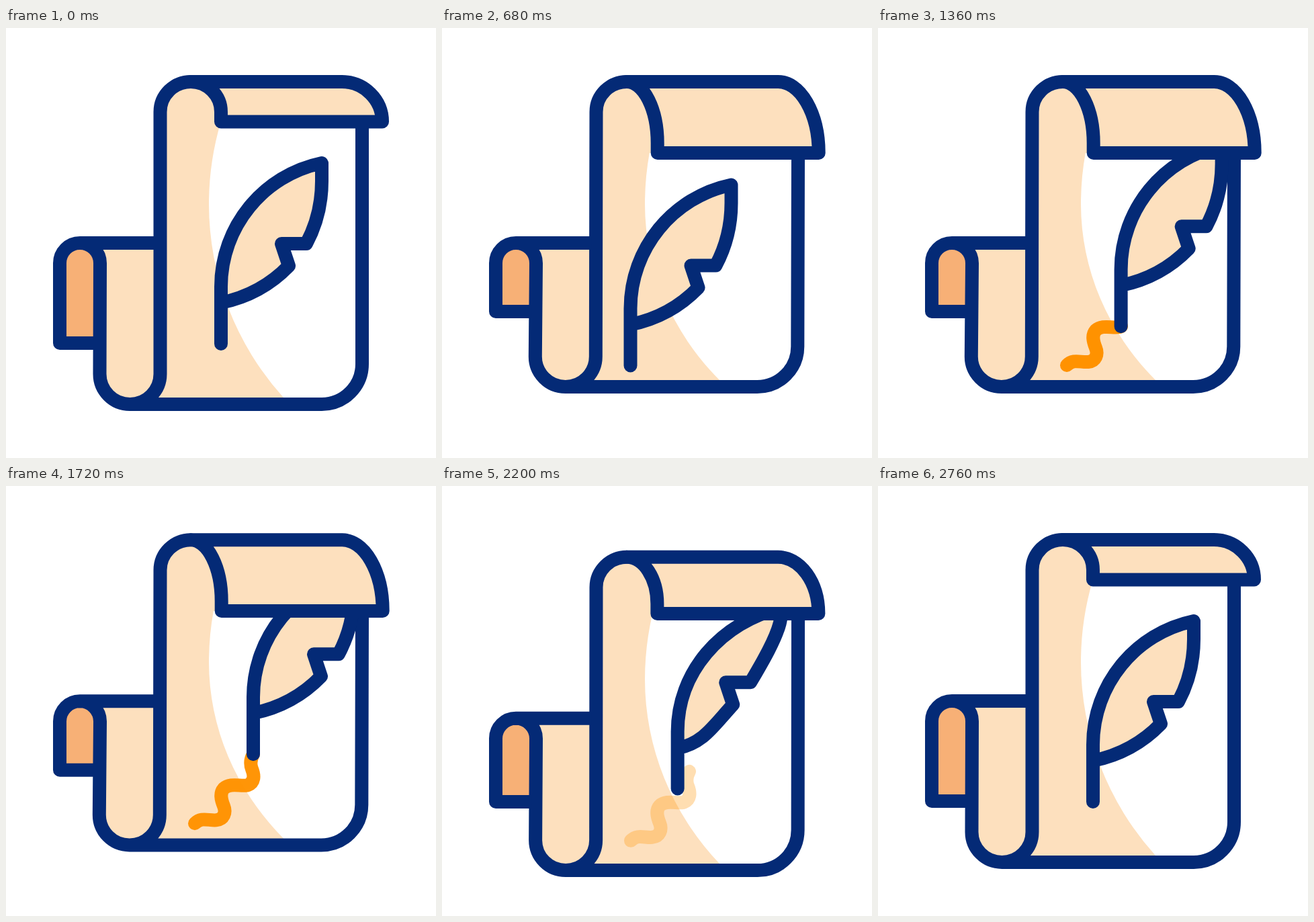
Animation of 640 by 640 pixels, one loop 3000 ms. Source, as an HTML page:

```html
<!DOCTYPE html>
<html lang="en">
<head>
<meta charset="utf-8">
<title>Scroll and quill</title>
<style>
  html, body { margin: 0; width: 100%; height: 100%; overflow: hidden; background: #fff; }
  svg { display: block; width: 100%; height: 100%; }
  .line { stroke: #042a76; stroke-width: 20; stroke-linecap: round; stroke-linejoin: round; }
  .peach { fill: #fde0be; }
</style>
</head>
<body>
<svg viewBox="0 0 640 640">
  <path id="fold" fill="#f7b076"/>
  <path id="back" class="peach"/>
  <path id="body" class="peach"/>
  <path id="shine" fill="#fff"/>
  <path id="edges" class="line" fill="none"/>
  <path id="ink" fill="none" stroke="#ff9200" stroke-width="20" stroke-linecap="round" stroke-linejoin="round"
    d="M281 502C291 492 301 498 313 497C324 496 328 486 324 476C320 466 318 457 324 450C334 441 348 447 360 445C370 441 370 431 366 421C363 413 364 406 368 399"/>
  <path id="quill" class="line peach"/>
  <path id="curl" class="line peach"/>
</svg>
<script>
const LOOP = 3000, STEP = 40;
const $ = id => document.getElementById(id);
const draw = (id, d) => $(id).setAttribute('d', d);
const mix = (a, b, k) => a + (b - a) * k;
const ramp = (t, a, b) => Math.min(1, Math.max(0, (t - a) / (b - a)));
const ease = (t, a, b) => (1 - Math.cos(Math.PI * ramp(t, a, b))) / 2;
const bump = (t, a, peak, b) => t < peak ? ease(t, a, peak) : 1 - ease(t, peak, b);

const ink = $('ink');
const inkLength = ink.getTotalLength();

// Quill outline relative to the nib: relaxed and bent by the air.
const relaxed = [0, -85, 0, -174, 63, -251, 150, -269, 150, -242, 150, -209, 142, -177, 127, -149,
  90, -149, 101, -116, 74, -88, 39, -69, 0, -61];
const bent = [0, -85, 0, -172, 62, -247, 157, -270, 152, -246, 146, -222, 128, -190, 109, -158,
  72, -158, 83, -125, 52, -91, 38, -68, 0, -60];

function quillPath(k) {
  const v = relaxed.map((n, i) => mix(n, bent[i], k).toFixed(2));
  const pts = (from, to) => v.slice(from, to).join(' ');
  return `M0 0L${pts(0, 2)}C${pts(2, 8)}L${pts(8, 10)}C${pts(10, 16)}L${pts(16, 20)}C${pts(20, 26)}`;
}

function drawScroll(drop, roll) {
  const top = 80 + drop;
  const lip = 139.5 + drop + 46.5 * roll;
  const base = 560 + drop - 26 * roll;
  const tail = 469 + drop - 47 * roll;
  const side = 320 + drop;
  const lean = 0.7 * roll;
  const bend = lip - 14.5 - top;
  const left = 229.5 - lean, right = 530 - lean, hem = 139.5 - lean;
  const lipX = 320 + lean;

  draw('fold', `M80 ${tail}V${side + 30}A30 30 0 0 1 140 ${side + 30}V${tail}Z`);
  draw('back', `M110 ${side}A30 30 0 0 1 140 ${side + 30}L${hem} ${base - 45}` +
    `A45 45 0 0 0 ${left} ${base - 45}L229.5 ${side}Z`);
  draw('body', `M229.5 ${top + 45}A45.5 45 0 0 1 275 ${top}` +
    `A45 ${bend} 0 0 1 ${lipX} ${lip - 14.5}V${lip}H530L${right} ${base - 60}` +
    `A60 60 0 0 1 ${right - 60} ${base}H${left - 45}A45 45 0 0 0 ${left} ${base - 45}Z`);

  const mid = 262 + drop, rise = mid - lip;
  const startX = 732 - Math.sqrt(430 * 430 - rise * rise);
  const ry = 430 * (base - 10 - mid) / 288;
  draw('shine', `M${startX} ${lip}A430 430 0 0 0 302 ${mid}A430 ${ry} 0 0 0 413 ${base - 10}` +
    `L422 ${base}H${right - 60}A60 60 0 0 0 ${right} ${base - 60}L530 ${lip}Z`);

  draw('edges', `M225 ${side}H110A30 30 0 0 0 80 ${side + 30}V${tail}H${hem}` +
    `M110 ${side}A30 30 0 0 1 140 ${side + 30}L${hem} ${base - 45}` +
    `A45 45 0 0 0 ${hem + 45} ${base}H${right - 60}A60 60 0 0 0 ${right} ${base - 60}L530 ${lip}` +
    `M${left - 45} ${base}A45 45 0 0 0 ${left} ${base - 45}L229.5 ${top + 45}` +
    `A45.5 45 0 0 1 275 ${top}`);
  draw('curl', `M275 ${top}H500A60.3 ${lip - top} 0 0 1 ${lipX + 240} ${lip}H${lipX}V${lip - 14.5}` +
    `A${lipX - 275} ${bend} 0 0 0 275 ${top}Z`);
}

function render(t) {
  const out = t < 1200;
  const roll = out ? ease(t, 160, 680) : 1 - ease(t, 1660, 2780);
  const drop = 27 * (out ? bump(t, 160, 400, 680) : bump(t, 1680, 2280, 2760));
  drawScroll(drop, roll);

  const written = inkLength * ramp(t, 720, 1605);
  const alpha = written > 0 ? 1 - ramp(t, 1700, 2420) : 0;
  ink.setAttribute('stroke-dasharray', `${written} ${inkLength + 50}`);
  ink.setAttribute('opacity', alpha);
  ink.setAttribute('transform', `translate(0 ${drop})`);

  let x, y;
  if (t <= 720) {
    x = mix(320, 280.5, roll);
    y = mix(470, 502.5, roll);
  } else {
    const nib = ink.getPointAtLength(written);
    const home = ease(t, 1810, 2760);
    x = mix(nib.x, 320, home);
    y = mix(nib.y, 470, home);
  }
  const flex = out ? 0.93 * bump(t, 160, 400, 680) : 1.1 * bump(t, 1800, 2280, 2760);
  const tilt = out ? -9.8 * bump(t, 160, 400, 680) : 0;
  draw('quill', quillPath(flex));
  $('quill').setAttribute('transform', `translate(${x} ${y + drop}) rotate(${tilt})`);
}

const start = performance.now();
function tick() {
  const t = (performance.now() - start) % LOOP;
  render(Math.floor(t / STEP) * STEP);
  requestAnimationFrame(tick);
}
tick();
</script>
</body>
</html>
```
